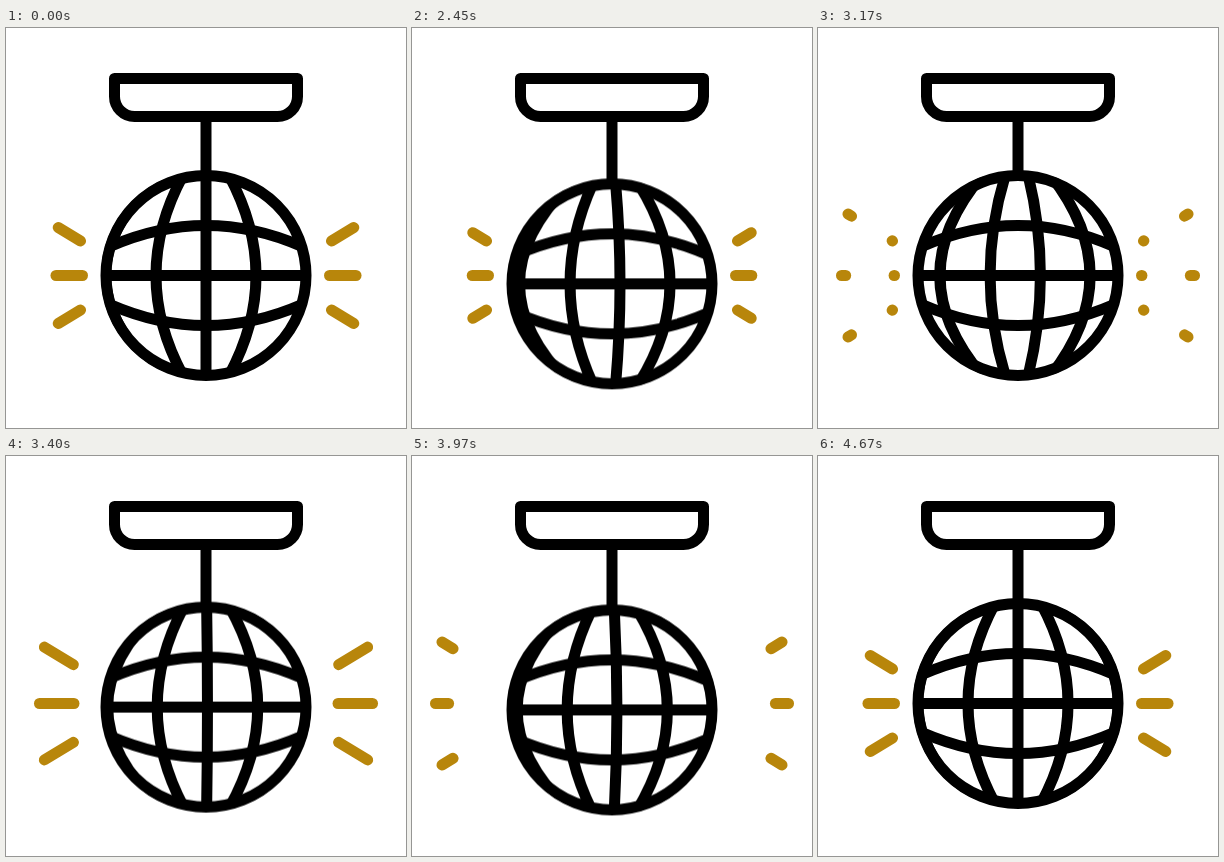
An HTML page without scripts that plays this animation: 400x400 px, repeating every 4.7 s.

```html
<!DOCTYPE html>
<html lang="en">
<head>
<meta charset="utf-8">
<title>Disco ball</title>
<style>
  html, body { margin: 0; width: 100%; height: 100%; overflow: hidden; background: #fff; }
  svg { display: block; width: 100vw; height: 100vh; }
  path { fill: none; stroke-width: 11; stroke-linejoin: round; }

  .frame { stroke: #000; }
  .rays { stroke: #b8860b; stroke-linecap: round; }

  .ball { animation: bob 4.7s infinite; }
  .meridians { animation: spin 4.7s linear infinite; }
  .first { animation: leave-and-return 4.7s linear infinite; }
  .pulse { animation: pulse 4.7s linear calc(var(--at) - 4.7s) infinite; }

  @keyframes bob {
    0%, 42.55%, 67.4%, 93%, 100% {
      transform: translateY(0);
      animation-timing-function: cubic-bezier(.37, 0, .63, 1);
    }
    54.96%, 79.15% {
      transform: translateY(9.5px);
      animation-timing-function: cubic-bezier(.37, 0, .63, 1);
    }
  }

  /* Eight meridians slide right by one ball width; the clip hides the spare ones. */
  @keyframes spin {
    0%, 42.55% {
      d: path("M-137-100q-326 100 0 200M-114-100q-271 100 0 200M-91-100q-217 100 0 200M-69-100q-163 100 0 200M-46-100q-109 100 0 200M-23-100q-54 100 0 200M0-100q0 100 0 200M23-100q54 100 0 200");
      animation-timing-function: linear(0, .01 8%, .035 16%, .075 23%, .135 30%, .235 36.5%, .36 43.8%, .5 52%, .65 61.8%, .72 68%, .775 73.8%, .865 82%, .95 90%, .99 96%, 1);
    }
    99.36%, 100% {
      d: path("M-46-100q-109 100 0 200M-23-100q-54 100 0 200M0-100q0 100 0 200M23-100q54 100 0 200M46-100q109 100 0 200M69-100q163 100 0 200M91-100q217 100 0 200M114-100q271 100 0 200");
    }
  }

  /* Each ray is 100 units long, running outwards. */
  @keyframes leave-and-return {
    0%, 42.45% { stroke-dasharray: 50 300; stroke-dashoffset: 0; opacity: 1; }
    44.15% { stroke-dasharray: 52 300; stroke-dashoffset: -8; }
    45.74% { stroke-dasharray: 52 300; stroke-dashoffset: -31; }
    47.87% { stroke-dasharray: 31 300; stroke-dashoffset: -69; }
    49.47% { stroke-dasharray: 8 300; stroke-dashoffset: -92; }
    51.06% { stroke-dasharray: .1 300; stroke-dashoffset: -99.8; opacity: 1; }
    51.07% { stroke-dasharray: .1 300; stroke-dashoffset: 0; opacity: 0; }
    85.74% { opacity: 0; }
    85.75% {
      stroke-dasharray: .1 300; stroke-dashoffset: 0; opacity: 1;
      animation-timing-function: cubic-bezier(.37, 0, .63, 1);
    }
    96.8%, 100% { stroke-dasharray: 50 300; stroke-dashoffset: 0; opacity: 1; }
  }

  @keyframes pulse {
    0% { stroke-dasharray: .1 300; stroke-dashoffset: 0; opacity: 1; }
    .96% { stroke-dasharray: 5 300; stroke-dashoffset: 0; }
    1.91% { stroke-dasharray: 17 300; stroke-dashoffset: 0; }
    3.51% { stroke-dasharray: 50 300; stroke-dashoffset: 0; }
    5.11% { stroke-dasharray: 66 300; stroke-dashoffset: -17; }
    7.02% { stroke-dasharray: 43 300; stroke-dashoffset: -57; }
    7.77% { stroke-dasharray: 25 300; stroke-dashoffset: -75; }
    8.83% { stroke-dasharray: 8 300; stroke-dashoffset: -92; }
    10.1% { stroke-dasharray: .1 300; stroke-dashoffset: -99.8; opacity: 1; }
    10.11%, 100% { stroke-dasharray: .1 300; stroke-dashoffset: -99.8; opacity: 0; }
  }
</style>
</head>
<body>
<svg viewBox="0 0 400 400">
  <defs>
    <clipPath id="disc"><circle r="105"/></clipPath>
    <g id="side">
      <path pathLength="100" d="M74.5 213L30 186"/>
      <path pathLength="100" d="M76.5 247.5H23.5"/>
      <path pathLength="100" d="M74.5 282L30 309"/>
    </g>
    <g id="rays">
      <use href="#side"/>
      <use href="#side" transform="matrix(-1 0 0 1 400 0)"/>
    </g>
  </defs>

  <g class="rays">
    <use class="first" href="#rays"/>
    <use class="pulse" href="#rays" style="--at: 2330ms"/>
    <use class="pulse" href="#rays" style="--at: 2755ms"/>
    <use class="pulse" href="#rays" style="--at: 3165ms"/>
    <use class="pulse" href="#rays" style="--at: 3605ms"/>
  </g>

  <g class="frame">
    <path d="M108.5 50.5H291.5V68.5a20 20 0 0 1-20 20H128.5a20 20 0 0 1-20-20z"/>
    <g class="ball">
      <path d="M200 84V147"/>
      <g transform="translate(200 247.5)">
        <g clip-path="url(#disc)">
          <path class="meridians" d="M-46-100q-109 100 0 200M-23-100q-54 100 0 200M0-100V100M23-100q54 100 0 200"/>
          <path d="M-96-29Q0-71 96-29M-100 0H100M-96 29Q0 71 96 29"/>
        </g>
        <circle r="100" fill="none" stroke-width="11"/>
      </g>
    </g>
  </g>
</svg>
</body>
</html>
```
